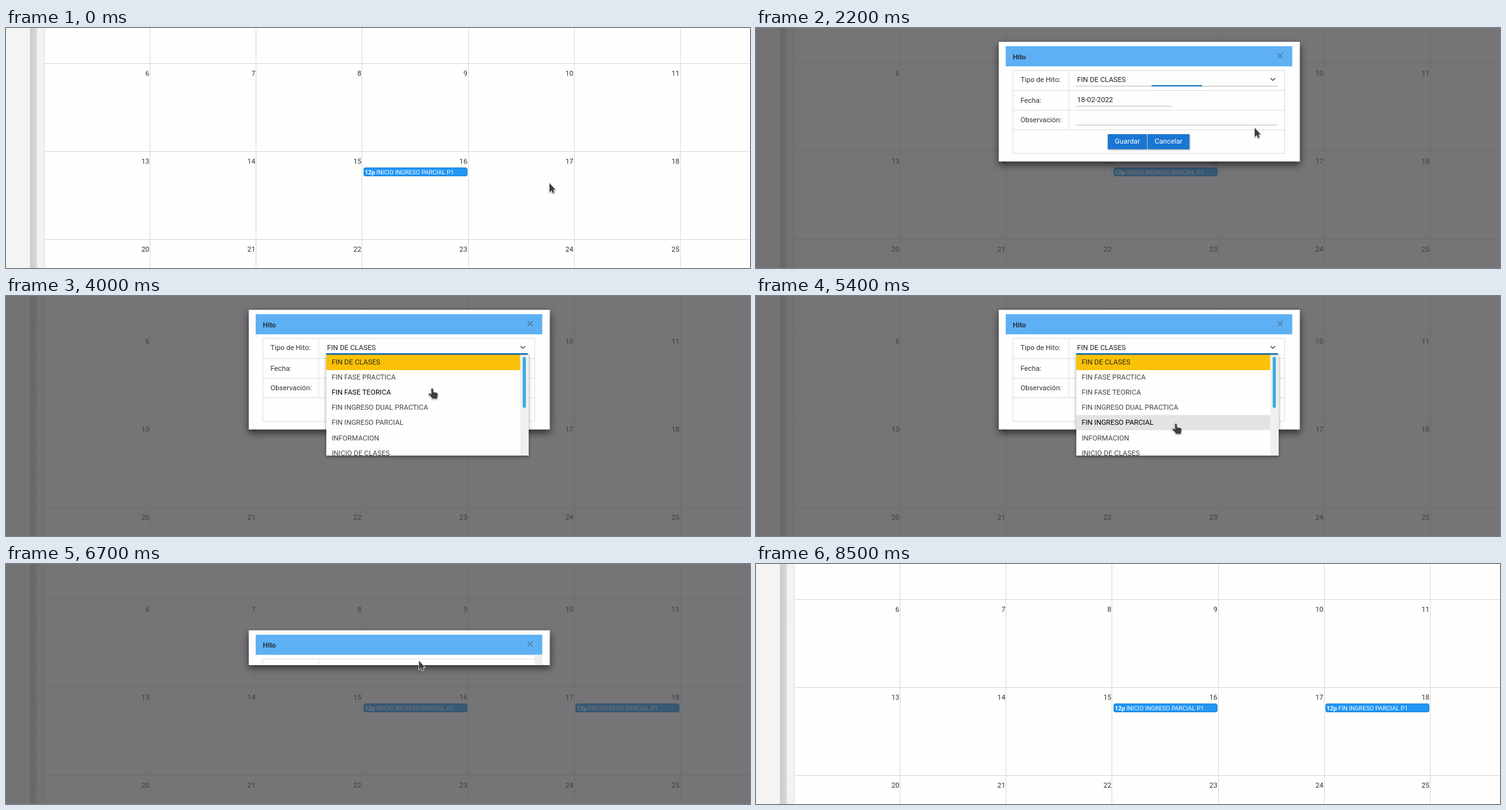
An HTML page with a canvas that plays this animation: 1180x382 px, repeating every 9.1 s.

```html
<!DOCTYPE html>
<html lang="es">
<head>
<meta charset="utf-8">
<title>Calendario</title>
<style>
html, body { margin: 0; width: 100%; height: 100%; overflow: hidden; background: #fefefd; }
canvas { display: block; }
</style>
</head>
<body>
<canvas id="stage" width="1180" height="382"></canvas>
<script>
const W = 1180, H = 382, LOOP = 9100, STEP = 100;
const ctx = document.getElementById('stage').getContext('2d');
const OPTIONS = ['FIN DE CLASES', 'FIN FASE PRACTICA', 'FIN FASE TEORICA',
  'FIN INGRESO DUAL PRACTICA', 'FIN INGRESO PARCIAL', 'INFORMACION', 'INICIO DE CLASES'];

// pointer path: time, x, y
const PATH = [
  [1000, 862, 247], [1400, 998, 239], [1800, 998, 239], [2200, 791, 159],
  [2600, 806, 130], [2700, 806, 130], [3100, 819, 81], [3500, 819, 81],
  [4000, 676, 147], [4200, 676, 147], [5000, 666, 203], [5500, 666, 203],
  [6200, 594, 212], [6400, 594, 212], [6700, 655, 154], [7000, 820, 203], [7300, 990, 240]
];

const clamp = v => Math.max(0, Math.min(1, v));
const swing = p => 0.5 - Math.cos(Math.PI * clamp(p)) / 2;

function rect(x, y, w, h, color) {
  ctx.fillStyle = color;
  ctx.fillRect(x, y, w, h);
}

function text(str, x, y, color = '#333', font = '11.25px', align = 'left') {
  ctx.font = font + ' Roboto, sans-serif';
  ctx.textAlign = align;
  ctx.fillStyle = color;
  ctx.fillText(str, x, y);
}

function stroke(points, color, width) {
  ctx.beginPath();
  points.forEach(([x, y], i) => i ? ctx.lineTo(x, y) : ctx.moveTo(x, y));
  ctx.strokeStyle = color;
  ctx.lineWidth = width;
  ctx.stroke();
}

function shadow(color, blur, dy) {
  ctx.shadowColor = color;
  ctx.shadowBlur = blur;
  ctx.shadowOffsetY = dy;
}

function pointerAt(t) {
  let a = PATH[0];
  for (const b of PATH) {
    if (t < b[0]) {
      const p = clamp((t - a[0]) / (b[0] - a[0] || 1));
      return [a[1] + (b[1] - a[1]) * p, a[2] + (b[2] - a[2]) * p];
    }
    a = b;
  }
  return [a[1], a[2]];
}

function calendarEvent(x, label) {
  ctx.beginPath();
  ctx.roundRect(x + 0.5, 222.5, 164, 13, 2.5);
  ctx.fillStyle = '#2196f3';
  ctx.fill();
  ctx.strokeStyle = '#1b83d8';
  ctx.lineWidth = 1;
  ctx.stroke();
  text('12p', x + 2, 232.5, '#fff', 'bold 9.56px');
  text(label, x + 20.4, 232.5, '#fff', '9.56px');
}

function calendar(saved) {
  rect(0, 0, W, H, '#fefefd');
  rect(0, 0, 38, H, '#f4f4f2');
  const edge = ctx.createLinearGradient(38, 0, 49, 0);
  edge.addColorStop(0, '#cbcbcb');
  edge.addColorStop(1, '#d9d9d8');
  rect(38, 0, 11, H, edge);
  rect(49, 0, 12, H, '#f3f3f2');
  rect(60, 0, 1, H, '#dcdcdc');
  for (let row = 0; row < 3; row++) {
    const y = 56 + row * 140;
    rect(61, y, W - 61, 1, '#d9d9d9');
    for (let col = 0; col < 6; col++)
      text(6 + row * 7 + col, 227.3 + col * 168.15, y + 19.7, '#333', '11.25px', 'right');
  }
  for (let col = 0; col < 6; col++)
    rect(Math.round(228 + col * 168.2), 0, 1, H, '#d9d9d9');
  calendarEvent(567, 'INICIO INGRESO PARCIAL P1');
  if (saved) calendarEvent(903, 'FIN INGRESO PARCIAL P1');
}

function chevron(x, y) {
  stroke([[x - 3.7, y - 1.8], [x, y + 1.9], [x + 3.7, y - 1.8]], '#444', 1.3);
}

function button(x, w, label) {
  shadow('rgba(0,0,0,.35)', 3, 1);
  rect(x, 169, w, 24, '#1976d2');
  shadow('transparent', 0, 0);
  text(label, x + w / 2, 184.3, '#fff', '11.25px', 'center');
}

function field(label, value, y, width, line) {
  text(label, 419.5, y + 4.3);
  text(value, 509.3, y + 3.7, '#222');
  rect(508, line, width, 1, '#bdbdbd');
}

function form(t, extra) {
  const grid = '#dedede';
  rect(396, 29, 454.5, 32, '#5eb0f5');
  text('Hito', 407.3, 49.7, '#2b3440', 'bold 11.25px');
  stroke([[827.3, 40], [835.3, 48]], '#56718a', 1.2);
  stroke([[835.3, 40], [827.3, 48]], '#56718a', 1.2);

  ctx.strokeStyle = grid;
  ctx.lineWidth = 1;
  ctx.strokeRect(407.5, 67.5, 431, 132 + extra);
  rect(495.5, 67, 1, 95 + extra, grid);
  rect(408, 99, 431, 1, grid);
  field('Tipo de Hito:', OPTIONS[extra ? 4 : 0], 82, 319, 92);
  chevron(819.7, 81.5);
  const focus = clamp((t - 2100) / 400) * 160;
  if (focus) rect(667.5 - focus, 91, focus * 2, 2, '#1976b9');

  if (extra) {
    field('Parcial:', 'P1', 114, 319, 124);
    chevron(819.7, 113.5);
    rect(408, 131, 431, 1, grid);
  }
  ctx.save();
  ctx.translate(0, extra);
  field('Fecha:', '18-02-2022', 114.5, 151, 124);
  rect(408, 130.5, 431, 1, grid);
  field('Observación:', '', 145.5, 319, 154);
  rect(408, 161.5, 431, 1, grid);
  button(558, 62, 'Guardar');
  button(621, 66.5, 'Cancelar');
  ctx.restore();
}

function dialog(t, open, extra) {
  const full = 190.5 + extra;
  const h = full * open;
  const top = 22 + (full - h) / 2;
  shadow('rgba(0,0,0,.6)', 11, 5);
  rect(385, top, 477.5, h, '#fefefe');
  shadow('transparent', 0, 0);
  ctx.save();
  ctx.beginPath();
  ctx.rect(385, top, 477.5, h);
  ctx.clip();
  ctx.translate(0, top - 22);
  form(t, extra);
  if (open < 1) rect(838, 61, 12.5, full, '#ededed');
  ctx.restore();
}

function dropdown(t, pointerY, alpha) {
  const rowH = 24.1, top = 93;
  const hover = t >= 3700 ? Math.floor((pointerY - top) / rowH) : -1;
  ctx.save();
  ctx.globalAlpha = alpha;
  shadow('rgba(0,0,0,.4)', 5, 2);
  rect(508, top, 321, 161, '#fefefd');
  shadow('transparent', 0, 0);
  ctx.beginPath();
  ctx.rect(508, top, 321, 161);
  ctx.clip();
  rect(815.5, top, 13.5, 161, '#efefef');
  ctx.beginPath();
  ctx.roundRect(819.5, 97, 5, 81, 2);
  ctx.fillStyle = '#39abe0';
  ctx.fill();
  OPTIONS.forEach((name, i) => {
    const y = top + i * rowH;
    if (i === 0) rect(508, y, 307.5, 25, '#fbc107');
    else if (i === hover && t > 4000) {
      ctx.globalAlpha = alpha * clamp((t - 4000) / 200);
      rect(508, y, 307.5, rowH, '#e3e3e3');
      ctx.globalAlpha = alpha;
    }
    text(name, 516.5, y + 16, i === hover ? '#000' : i ? '#444' : '#2d2a1c');
  });
  rect(508, top, 321, 0.6, '#1f5f96');
  ctx.restore();
}

function pointer(x, y, hand) {
  const shape = new Path2D(hand
    ? 'M-1.5 1Q0 -1 1.4 1L1.8 6L7.5 7.2Q9 7.6 8.8 10L7.8 16.5H0L-1.2 14L-5.4 9.8Q-5.8 7.6 -3.8 8.2L-1.4 9.4Z'
    : 'M0 0V14.4L3.2 11.4L5.2 16L7.7 15L5.8 10.6H9.6Z');
  ctx.save();
  ctx.translate(x, y);
  ctx.lineJoin = 'round';
  shadow('rgba(0,0,0,.35)', 2, 1);
  ctx.strokeStyle = '#f4f4f4';
  ctx.lineWidth = 1.6;
  ctx.stroke(shape);
  shadow('transparent', 0, 0);
  ctx.fillStyle = '#3e3e40';
  ctx.fill(shape);
  ctx.restore();
}

function draw(t) {
  const [x, y] = pointerAt(t);
  calendar(t >= 6500);
  if (t >= 1800 && t < 6900) {
    rect(0, 0, W, H, 'rgba(66,66,68,.72)');
    const open = t < 6400 ? swing((t - 1692) / 400) : 1 - swing((t - 6433) / 400);
    if (open > 0) dialog(t, open, t >= 5600 ? 32 : 0);
    if (t >= 3300 && t < 5600)
      dropdown(t, y, Math.min(clamp((t - 3200) / 200), clamp((5700 - t) / 200)));
  }
  if (t < 7400) pointer(x, y, (t >= 3100 && t < 5600) || (t >= 6100 && t < 6500));
}

const start = performance.now();
function tick() {
  const t = (performance.now() - start) % LOOP;
  draw(Math.floor(t / STEP) * STEP);
  requestAnimationFrame(tick);
}
tick();
</script>
</body>
</html>
```
